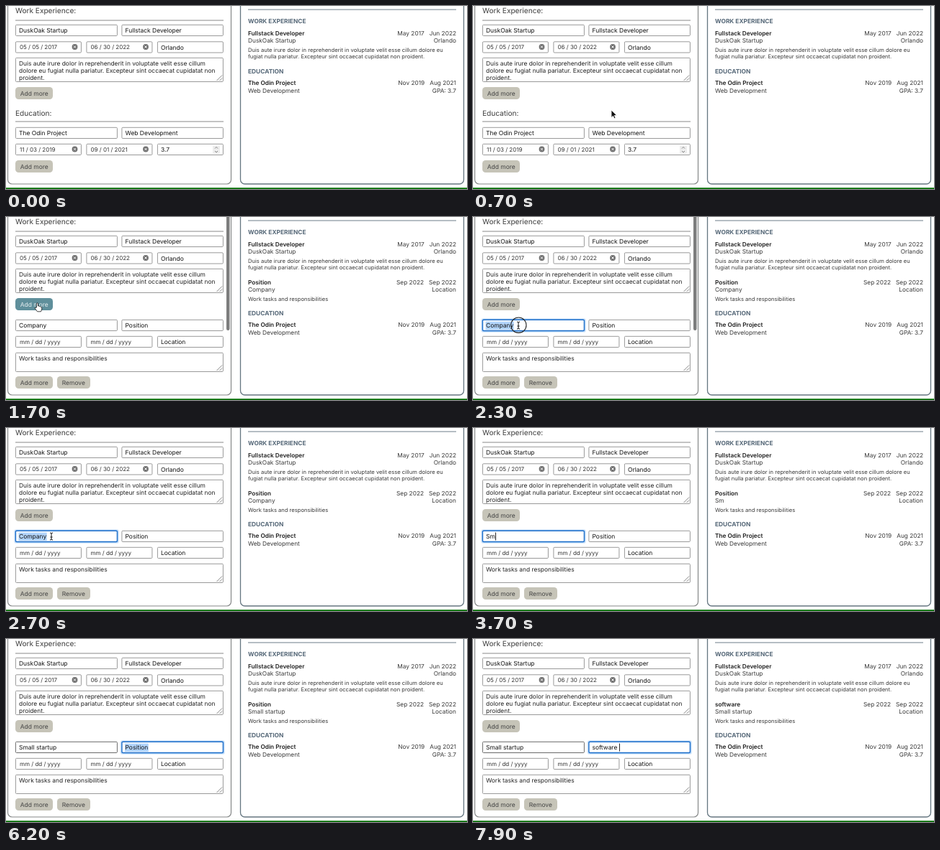
An HTML page that plays this animation: 640 px wide and 255 px high, repeating every 8 s.

```html
<!DOCTYPE html>
<html lang="en">
<head>
<meta charset="utf-8">
<title>Resume builder</title>
<style>
html, body { margin: 0; width: 100%; height: 100%; overflow: hidden; background: #fff; }
svg { display: block; width: 640px; height: 255px; }
text { font-family: Inter, "Open Sans", sans-serif; white-space: pre; text-rendering: geometricPrecision; }
</style>
</head>
<body>
<svg id="stage" viewBox="0 0 640 255"></svg>
<script>
const stage = document.getElementById('stage');
const pen = document.createElement('canvas').getContext('2d');
const SIZE = 8.45, EMPLOYER = 'DuskOak Startup';

// Text and basic shapes
const text = (s, x, y, { size = SIZE, fill = '#111', weight = 400, end } = {}) =>
  `<text x="${x}" y="${y}" font-size="${size}" fill="${fill}" font-weight="${weight}"${end ? ' text-anchor="end"' : ''}>${s}</text>`;
const rect = (x, y, w, h, r, style) =>
  `<rect x="${x}" y="${y}" width="${w}" height="${h}" rx="${r}" ${style}/>`;
const path = (d, stroke, width = 1, fill = 'none') =>
  `<path d="${d}" stroke="${stroke}" stroke-width="${width}" fill="${fill}" stroke-linejoin="round"/>`;
const widthOf = s => {
  pen.font = `${SIZE}px Inter, "Open Sans", sans-serif`;
  return pen.measureText(s).width;
};

// Form controls
const box = (x, y, w, h, stroke = '#999') =>
  rect(x + .4, y + .3, w - 1, h - .8, 1.2, `fill="#fff" stroke="${stroke}"`);

function input(s, x, y, w, { focus, selected, caret, dark } = {}) {
  let out = box(x, y, w, 16, dark ? '#6a6a6a' : undefined);
  if (focus) {
    out = rect(x - 2, y - 2, w + 4, 20, 3.5, 'fill="#dcebfb"') +
      rect(x - 1, y - 1, w + 2, 18, 2.5, 'fill="#b4d5f6"') +
      rect(x + .4, y + .3, w - 1, 15.2, 1.5, 'fill="#fff" stroke="#1f6fca" stroke-width="1.4"');
  }
  const tx = x + 5, end = tx + widthOf(s);
  if (selected) out += rect(tx - .5, y + 2.5, end - tx + 1, 11.5, 0, 'fill="#b3d5fb"');
  out += text(s, tx, y + 11.2);
  if (caret) out += rect(end + .3, y + 2.5, .9, 11, 0, 'fill="#111"');
  return out;
}

function date(s, x, y, filled = true) {
  const cx = x + 82.5, cy = y + 7.5;
  return box(x, y, 92, 16) + text(s, x + 6, y + 10.8, { size: 8, fill: '#333' }) + (filled
    ? `<circle cx="${cx}" cy="${cy}" r="3.9" fill="#707070"/>` +
      path(`M${cx - 1.6} ${cy - 1.6}l3.2 3.2m0 -3.2l-3.2 3.2`, '#fff')
    : '');
}

const area = (lines, y, h) => box(13, y, 289, h) +
  lines.map((s, i) => text(s, 18, y + 10.5 + i * 10.2, { size: 8.4, fill: '#222' })).join('') +
  path(`M292.5 ${y + h - 2}l7.5 -7.5M296.5 ${y + h - 2}l3.5 -3.5`, '#777', .9);

const button = (s, x, y, w, hot) =>
  rect(x, y, w, 17, 4.5, `fill="${hot ? '#5f8f9b' : '#c6c4b8'}"`) +
  text(s, x + 6.8, y + 11.6, { fill: hot ? '#e6eef0' : '#454545' });

const heading = (s, y) => text(s, 13, y, { size: 10.1, fill: '#3c3c3c' });
const gpa = (x, y) => input('3.7', x, y, 92) +
  rect(x + 77, y + 2.5, 10, 11.5, 1, 'fill="#ededed"') +
  path(`M${x + 80} ${y + 6.5}l2 -2l2 2m-4 3.5l2 2l2 -2`, '#777', .9);

// One entry of the finished page
function entry(y, title, dates, sub, place) {
  const o = { size: 8.3, fill: '#3a3a3a' }, right = { ...o, end: true };
  return text(title, 336, y, { size: 8.25, weight: 600, fill: '#222' }) +
    text(dates.join('   '), 625, y, right) +
    text(sub, 336, y + 10.3, o) + text(place, 625, y + 10.3, right);
}
const title = (s, y) => text(s, 336, y, { size: 8.35, weight: 700, fill: '#566878' });
const small = (s, y) => text(s, 336, y, { size: 7.6, fill: '#3a3a3a' });

// Typing: a letter appears at each listed time
const typed = (s, times, t) => s.slice(0, times.filter(k => k <= t).length);
const COMPANY = [3300, 3700, 3900, 4000, 4100, 4400, 4500, 4600, 4700, 4900, 5000, 5100, 5200];
const ROLE = Array.from('software ', (_, i) => 6500 + i * 100);

// Pointer: time, x, y
const TRACK = [[700, 192, 145], [800, 150, 146], [900, 84, 140], [1000, 52, 126],
  [1100, 44, 121], [1700, 44, 121], [1900, 54, 137], [2100, 63, 151], [3300, 63, 151]];

function pointerAt(t) {
  const i = TRACK.findIndex(k => k[0] > t);
  if (i < 1) return null;
  const [a, ax, ay] = TRACK[i - 1], [b, bx, by] = TRACK[i];
  const k = (t - a) / (b - a);
  return { x: ax + (bx - ax) * k, y: ay + (by - ay) * k };
}
const overButton = p => !!p && p.x < 65 && p.y > 113 && p.y < 130;

function pointer(p, t) {
  if (!p) return '';
  const { x, y } = p;
  let out;
  if (overButton(p)) {
    out = path(`M${x - 1.5} ${y + 5}v-5q0 -1.3 1 -1.3t1 1.3v3q2 -.5 2 .6q1.6 -.3 1.7 .7q1.5 0 1.5 1.2v2.5l-1.2 2.8h-5l-3.2 -4.3q-.6 -1.8 1.2 -1z`, '#111', .8, '#fff');
  } else if (t >= 2000) {
    const beam = `M${x - 2} ${y - 5}q2 0 2 1.5v7q0 1.5 -2 1.5m4 -10q-2 0 -2 1.5m0 7q0 1.5 2 1.5m-3.5 -4h3`;
    out = path(beam, '#fff', 2.2) + path(beam, '#111', 1);
  } else {
    out = path(`M${x} ${y}v10.5l2.5 -2.3l1.6 3.6l1.8 -.8l-1.6 -3.5h3.3z`, '#fff', .8, '#111');
  }
  const age = t - (t < 2200 ? 1300 : 2200);
  if (age >= 0 && age < 200)
    out += `<circle cx="${x + .3}" cy="${y - .3}" r="${age < 100 ? 19.3 : 10.7}" fill="none" stroke="#222" stroke-width="1.1"/>`;
  return out;
}

function newJob(t, company, role) {
  const onCompany = t >= 2200 && t < 6100, onRole = t >= 6100;
  return input(company, 13, 143, 142, { focus: onCompany, selected: onCompany && t < 3300,
      caret: t >= 3300 && t < 5700, dark: onRole }) +
    input(role, 160.5, 143, 141.5, { focus: onRole, selected: onRole && t < 6500,
      caret: t >= 6500 && (t < 7400 || t >= 7900) }) +
    date('mm / dd / yyyy', 13, 166, false) + date('mm / dd / yyyy', 111.5, 166, false) +
    input('Location', 210, 166, 92) +
    area(['Work tasks and responsibilities'], 189, 27) +
    button('Add more', 13, 222, 52) + button('Remove', 71, 222, 46);
}

const education = () => heading('Education:', 152.8) + path('M13 161H302', '#888') +
  input('The Odin Project', 13, 169, 142) + input('Web Development', 160.5, 169, 141.5) +
  date('11 / 03 / 2019', 13, 192) + date('09 / 01 / 2021', 111.5, 192) + gpa(210, 192) +
  button('Add more', 13, 215, 52);

function draw(t) {
  const added = t >= 1400, p = pointerAt(t);
  const company = t < 3300 ? 'Company' : typed('Small startup', COMPANY, t);
  const role = t < 6500 ? 'Position' : typed('software ', ROLE, t);
  const shift = added ? 43 : 0;

  let out = rect(2.5, -20, 310, 268, 6, 'fill="#fff" stroke="#858888" stroke-width="1.2"') +
    rect(325.5, -20, 310, 268, 6, 'fill="#fff" stroke="#657680" stroke-width="1.3"') +
    rect(0, 253.2, 640, 1.8, 0, 'fill="#0b720b"');

  out += heading('Work Experience:', 10.3) + path('M13 20H302', '#888') +
    input(EMPLOYER, 13, 26, 142) + input('Fullstack Developer', 160.5, 26, 141.5) +
    date('05 / 05 / 2017', 13, 49.5) + date('06 / 30 / 2022', 111.5, 49.5) +
    input('Orlando', 210, 49.5, 92) +
    area(['Duis aute irure dolor in reprehenderit in voluptate velit esse cillum',
      'dolore eu fugiat nulla pariatur. Excepteur sint occaecat cupidatat non',
      'proident.'], 72, 34) +
    button('Add more', 13, 113, 52, overButton(p)) +
    (added ? newJob(t, company, role) : education());

  out += path('M336 5H625', '#6d7d88') + title('WORK EXPERIENCE', 23.8) +
    entry(40.8, 'Fullstack Developer', ['May 2017', 'Jun 2022'], EMPLOYER, 'Orlando') +
    small('Duis aute irure dolor in reprehenderit in voluptate velit esse cillum dolore eu', 63.9) +
    small('fugiat nulla pariatur. Excepteur sint occaecat cupidatat non proident.', 73.4) +
    (added ? entry(93.6, role, ['Sep 2022', 'Sep 2022'], company, 'Location') +
      small('Work tasks and responsibilities', 116.9) : '') +
    title('EDUCATION', 93.7 + shift) +
    entry(110.4 + shift, 'The Odin Project', ['Nov 2019', 'Aug 2021'], 'Web Development', 'GPA: 3.7');

  const bar = added ? Math.min(1, Math.max(0, (2700 - t) / 300)) : 0;
  if (bar) out += rect(306, -10, 4.5, 168, 2.2, `fill="#7d7d7d" opacity="${bar}"`);
  stage.innerHTML = out + pointer(p, t);
}

// The picture advances in steps of 100 ms
const start = performance.now();
let last = -1;
function tick() {
  const t = Math.floor((performance.now() - start) % 8000 / 100) * 100;
  if (t !== last) draw(last = t);
  requestAnimationFrame(tick);
}
tick();
</script>
</body>
</html>
```
